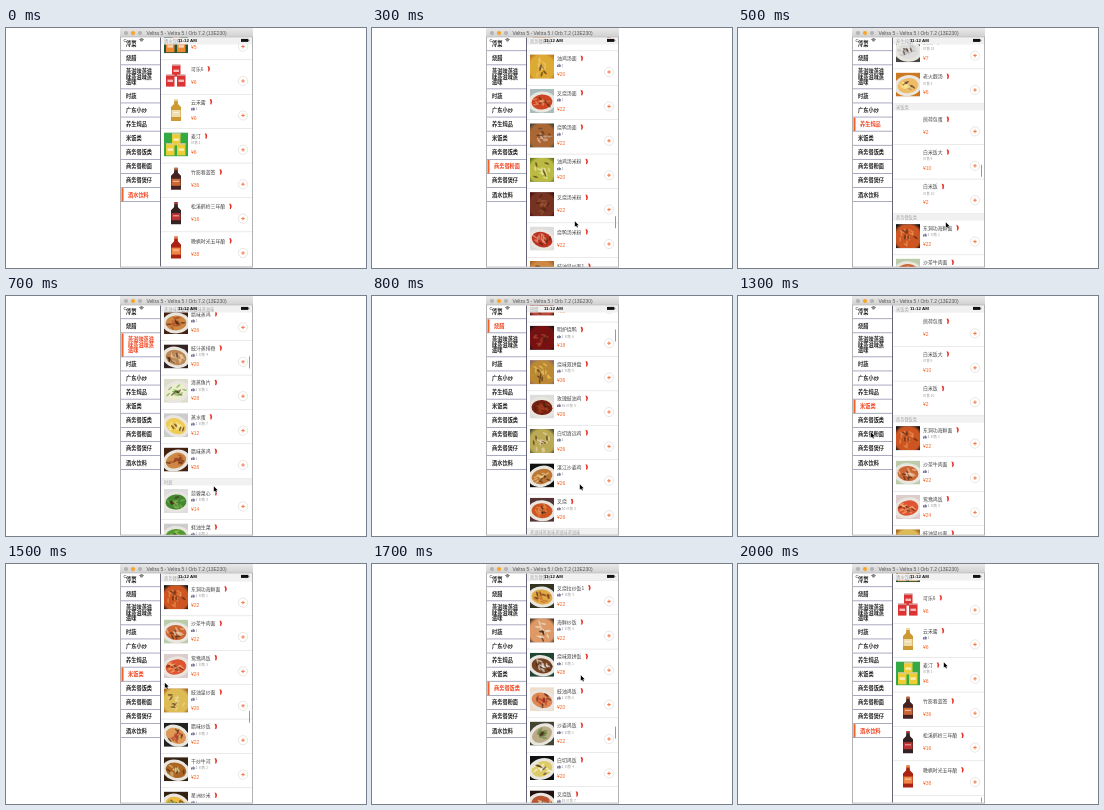
An HTML page with a canvas that plays this animation: 360 px wide and 240 px high, repeating every 2100 ms.

```html
<!DOCTYPE html>
<html lang="zh-CN">
<head>
<meta charset="utf-8">
<style>
html, body { margin: 0; width: 100%; height: 100%; overflow: hidden; background: #fff; }
canvas { display: block; width: 360px; height: 240px; }
</style>
</head>
<body>
<canvas id="stage"></canvas>
<script>
const LOOP = 2100, STEP = 100;
const ROW = 34.4, HEAD = 7, TOP = 9.5, VIEW = 229;
const CJK = '"Noto Sans CJK SC", "Noto Sans CJK", sans-serif';
const LATIN = '"Liberation Sans", Arial, sans-serif';

// Dish: name, price, likes/sold, picture kind (p plate, f full, b bottle, c cans, n none), backdrop, main tone, accent
const sections = [
  ['冷菜', 10, `凉拌青瓜 12 1/3 p #ddd #7a3 #cd8
    卤水拼盘 28 2/4 p #311 #a63 #d96
    皮蛋豆腐 15 1/2 p #ccc #eeb #543`],
  ['烧腊', 8, `脆皮乳鸽 22 3/2 p #321 #a52 #d84
    蜜汁排骨 32 1/5 f #411 #b43 #d75
    明炉烧鸭 18 2/6 f #211 #711 #a43
    烧味双拼盘 36 2/5 f #866 #b83 #ec6
    玫瑰豉油鸡 26 36/9 p #ddd #721 #a42
    白切清远鸡 26 2 f #553 #ba5 #edb
    湛江沙姜鸡 26 1 p #111 #b73 #ec8
    叉烧 26 30/3 p #533 #c52 #e95`],
  ['蒸滋味蒸滋味蒸滋味蒸滋味', 12, `豉汁蒸排骨 20 1/4 p #322 #b85 #eca
    清蒸鱼片 28 2/1 p #ddc #eec #6a4
    蒸水蛋 12 1/7 p #ccc #ec5 #fe9
    腊味蒸鸡 26 1 p #421 #c84 #a42`],
  ['时蔬', 10, `蒜蓉菜心 14 2/3 p #ddd #483 #8b5
    蚝油生菜 14 1/2 p #ccc #593 #ac6
    清炒芥兰 16 1 p #222 #373 #7a4`],
  ['广东小炒', 16, `干炒牛河 22 4/8 p #421 #a62 #dc8
    咕噜肉 26 2/4 p #ddd #d52 #fb5
    凉瓜炒蛋 20 1/3 p #332 #db4 #7a3
    椒盐排骨 28 3/2 p #211 #b73 #d95`],
  ['养生炖品', 9, `乌鸡炖汤 12 1/4 p #333 #864 #321
    花旗参汤 15 1 p #ddd #c95 #edb
    椰子炖鸡 16 2/3 p #432 #eda #fff
    淮山炖汤 12 1/2 p #433 #db8 #eee
    莲藕排骨汤 12 1/5 p #532 #b75 #dba
    雪梨炖盅 10 /6 p #ddd #ed9 #fff
    冬瓜炖汤 9 /8 p #344 #cc9 #eec
    例汤 7 /18 p #444 #ddd #bbb
    老火靓汤 6 /3 p #c72 #eb6 #fe9`],
  ['米饭类', 3, `煎荷包蛋 2 - n
    白米饭大 10 /9 n
    白米饭 2 /10 n`],
  ['商务餐饭类', 19, `东洞功海鲜面 22 1/1 f #111 #c52 #e95
    沙茶牛肉面 22 1 p #bca #c63 #eca
    鸳鸯鸡饭 24 1/3 p #dcc #d53 #fb7
    豉油皇炒面 20 1 f #a62 #db5 #ed9
    腊味炒饭 22 2/3 p #222 #d95 #b43
    干炒牛河 22 1/2 p #321 #a62 #dc8
    星洲炒米 22 1 p #321 #eb4 #7a3
    扬州炒饭 20 3/6 p #222 #eb6 #c53
    叉烧拉炒饭1 22 4/3 p #332 #da4 #c63
    海鲜炒饭 22 2/3 f #532 #d96 #eed
    烧味双拼饭 28 2/1 p #243 #742 #eee
    豉油鸡饭 20 1/6 p #edc #d85 #b32
    沙姜鸡饭 22 6/1 p #443 #ba8 #583
    白切鸡饭 20 2/4 p #111 #dc6 #fff
    叉烧饭 20 35/7 p #211 #b53 #eda`],
  ['商务餐粉面', 12, `牛腩汤面 24 1 p #322 #a63 #dc8
    鲜虾汤面 22 1 p #ddc #e94 #fd9
    油鸡汤面 20 1 f #b72 #da3 #ec7
    叉烧汤面 22 1 p #abb #c42 #e96
    烧鸭汤面 22 1 f #443 #a63 #dba
    油鸡汤米粉 20 1 f #672 #bb4 #eea
    叉烧汤米粉 22 - f #411 #732 #953
    烧鸭汤米粉 22 - p #ddd #b32 #ea8
    豉油皇炒面1 20 - f #a62 #c84 #db5`],
  ['商务餐煲仔', 7, `腊味煲仔饭 26 1/2 p #211 #b53 #eda
    排骨煲仔饭 26 2/3 p #222 #a74 #eda
    滑鸡煲仔饭 24 1 p #321 #da6 #fff`],
  ['酒水饮料', 8, `雪碧汽水 5 - c #fff #3a4
    橙汁 5 - c #253 #e83
    可乐6 6 - c #fff #d33
    云禾露 6 1 b #fff #c93 #eda
    麦汀 6 /1 c #3a4 #ec3
    竹影巷蓝签 36 - b #fff #422 #c63
    松溪鹤岭三年酿 16 - b #fff #322 #b33
    晚枫时光五年酿 38 - b #fff #a21 #e84`]
].map(([title, count, text]) => ({ title, count, dishes: text.split('\n').map(s => s.trim().split(' ')) }));

let total = 0;
for (const s of sections) {
  s.y = total;
  total += HEAD + s.count * ROW;
}
const END = total - VIEW;

// One value per step
const scrolls = [END, 3690, 3440, 3111, 2680, 2212, 1580, 880, 410, 260, 330, 1050, 1960, 2278, 2310, 2387, 2520, 2663.4, 3040, 3500, END + 7];
// time, x, y
const pointer = [[100, 206, 130], [300, 204, 196], [500, 209, 197], [800, 209, 191], [1100, 135, 111],
  [1300, 134, 139], [1400, 135, 125], [1700, 210, 114], [2000, 207, 101]];

const canvas = document.getElementById('stage');
const c = canvas.getContext('2d');
const dpr = window.devicePixelRatio || 1;
canvas.width = 360 * dpr;
canvas.height = 240 * dpr;

function rect(x, y, w, h, color) {
  c.fillStyle = color;
  c.fillRect(x, y, w, h);
}
function oval(x, y, rx, ry, color, turn = 0) {
  c.fillStyle = color;
  c.beginPath();
  c.ellipse(x, y, rx, ry, turn, 0, 7);
  c.fill();
}
function shape(points, color) {
  c.fillStyle = color;
  c.beginPath();
  points.forEach(([x, y]) => c.lineTo(x, y));
  c.fill();
}
function label(text, x, y, size, color, weight = 400, font = CJK, align = 'left') {
  c.font = `${weight} ${size}px ${font}`;
  c.textAlign = align;
  c.textBaseline = 'alphabetic';
  c.fillStyle = color;
  c.fillText(text, x, y + size * 0.37);
  return c.measureText(text).width;
}
function clipped(x, y, w, h, draw) {
  c.save();
  c.beginPath();
  c.rect(x, y, w, h);
  c.clip();
  draw();
  c.restore();
}
const noise = n => { const v = Math.sin(n * 127.1) * 43758.5; return v - Math.floor(v); };

function food(x, y, full, back, tone, accent, seed) {
  const cx = x + 12, cy = y + 13, turn = noise(seed) - 0.5;
  if (!full) oval(cx, cy, 14, 10.5, '#e9e5df', turn);
  const g = c.createRadialGradient(cx, cy, 4, cx, cy, full ? 16 : 12);
  g.addColorStop(0, tone);
  g.addColorStop(0.7, tone);
  g.addColorStop(1, full ? back : tone);
  if (full) rect(x, y, 24, 24, g);
  else oval(cx, cy, 10.5, 7.5, g, turn);
  c.globalAlpha = 0.6;
  for (let k = 1; k < 17; k++) {
    const a = noise(seed + k) * 6.28, r = noise(seed + k * 3.7);
    oval(cx + Math.cos(a) * r * 9, cy + Math.sin(a) * r * (full ? 9 : 6), 2.6, 0.9, k % 3 ? accent : '#421', turn * 2 + k % 2);
  }
  c.globalAlpha = 1;
}
function bottle(x, y, tone, tag) {
  shape([[10.5, 1], [13.5, 1], [14, 6], [17, 9], [17, 23], [7, 23], [7, 9], [10, 6]].map(p => [x + p[0], y + p[1]]), tone);
  rect(x + 7.5, y + 12, 9, 7, tag);
  rect(x + 9, y + 14, 6, 1.2, '#fff8');
  rect(x + 10.3, y + 1, 3.4, 2, tag);
}
function cans(x, y, tone) {
  for (const [dx, dy] of [[8, 1], [2, 11], [13, 11]]) {
    rect(x + dx, y + dy, 8.5, 12, tone);
    rect(x + dx, y + dy, 8.5, 1, '#ccc');
    rect(x + dx + 1.5, y + dy + 5, 5.5, 2.4, '#fffa');
  }
}
function picture(x, y, [kind, back, tone, accent], seed) {
  if (kind === 'n') return;
  clipped(x, y, 24, 24, () => {
    rect(x, y, 24, 24, back);
    if (kind === 'b') bottle(x, y, tone, accent);
    else if (kind === 'c') cans(x, y, tone);
    else food(x, y, kind === 'f', back, tone, accent, seed);
  });
}

function likes(text, y) {
  const [up, sold] = text.split('/');
  let x = 185;
  if (up) {
    rect(x, y - 0.5, 1, 2.2, '#779');
    shape([[x + 1.3, y - 0.4], [x + 2.2, y - 1.8], [x + 2.8, y - 0.6], [x + 4, y - 0.5], [x + 3.5, y + 1.7], [x + 1.3, y + 1.7]], '#779');
    x += 4.6 + label(up, x + 4.6, y, 3.4, '#888') + 1;
  }
  if (sold) label('已售 ' + sold, x, y, 3.4, '#999');
}

function dishRow([name, price, liked, ...pic], y, seed) {
  const rated = liked !== '-';
  picture(158, y + 3.5, pic, seed);
  const ny = y + (rated ? 7.2 : 8.7);
  const fx = 185 + label(name, 185, ny, 4.9, '#444') + 4;
  shape([[fx, ny - 2.8], [fx + 1.8, ny - 2.4], [fx + 2.5, ny], [fx + 1.7, ny + 2.7], [fx + 0.5, ny + 2.5], [fx + 0.8, ny]], '#e5352b');
  if (rated) likes(liked, y + 14.2);
  label('¥' + price, 185, y + (rated ? 23.2 : 21.7), 5, '#f4692b', 400, LATIN);
  c.strokeStyle = '#ddd6d2';
  c.lineWidth = 0.6;
  c.beginPath();
  c.arc(237, y + 20.9, 4.6, 0, 7);
  c.stroke();
  rect(235.2, y + 20.45, 3.6, 0.9, '#f4703a');
  rect(236.55, y + 19.1, 0.9, 3.6, '#f4703a');
  rect(155, y + ROW - 0.5, 91, 0.5, '#d4d4d4');
}

function header(title, y) {
  rect(155, y, 91, HEAD, '#f1f1f1');
  label(title, 158, y + 3.5, 4.2, '#a4a4a4');
}

function list(scroll, active) {
  const at = y => y - scroll + TOP;
  sections.forEach((s, n) => {
    for (let i = 0; i < s.count; i++) {
      const y = at(s.y + HEAD + i * ROW);
      if (y > -ROW && y < 240) dishRow(s.dishes[i % s.dishes.length], y, n * 40 + i * 7);
    }
    header(s.title, at(s.y));
  });
  const next = sections[active + 1];
  header(sections[active].title, next ? Math.min(TOP, at(next.y) - HEAD) : TOP);
}

function menu(active) {
  let y = 8.7;
  sections.forEach((s, i) => {
    const lines = s.title.match(/.{1,5}/gu);
    const h = lines.length > 1 ? 24 : 14.1;
    const on = i === active;
    if (on) rect(115.5, y + 0.5, 2, h - 0.7, '#f4602a');
    lines.forEach((t, k) => label(t, on ? 122 : 120.1, y + h / 2 + (k - (lines.length - 1) / 2) * 5.4, 5.2, on ? '#f0441f' : '#222', 700));
    y += h;
    rect(115, y - 0.4, 39, 0.7, '#8587a5');
  });
  rect(154, TOP, 0.9, VIEW, '#555568');
}

function chrome() {
  const g = c.createLinearGradient(0, 0, 0, 9);
  g.addColorStop(0, '#e9e9e9');
  g.addColorStop(1, '#d0d0d0');
  rect(114, 0, 133, 9, g);
  rect(114, 8.8, 133, 0.5, '#aaa');
  ['#b4b4b4', '#f6a62c', '#b4b4b4'].forEach((color, i) => oval(120 + i * 7, 5.1, 2.1, 2.1, color));
  label('Veltra 5 - Veltra 5 / Orb 7.2 (13E230)', 180.5, 5, 4.95, '#555', 400, LATIN, 'center');
  rect(114, 9, 0.9, 230, '#aaa');
  rect(246, 9, 0.9, 230, '#aaa');
  rect(114, 238.7, 133, 0.8, '#aaa');
}

function statusBar() {
  label('Carrier', 117.5, 12.4, 4.2, '#111', 400, LATIN);
  c.strokeStyle = '#111';
  c.lineWidth = 0.7;
  for (const r of [1, 2.1, 3.2]) {
    c.beginPath();
    c.arc(135.5, 14, r, -2.3, -0.84);
    c.stroke();
  }
  label('11:12 AM', 181.4, 12.4, 4.4, '#111', 700, LATIN, 'center');
  rect(235, 10.9, 7.3, 3, '#111');
  rect(242.6, 11.8, 0.6, 1.3, '#111');
}

function scrollBar(scroll) {
  const over = Math.max(0, scroll - END), h = 12 - over;
  const y = over ? TOP + VIEW - h : TOP + 0.5 + scroll / END * 216;
  rect(243, y, 1, h, '#999');
}

function arrow(t) {
  const k = pointer.findIndex(p => p[0] >= t);
  if (t < pointer[0][0] || k < 0) return;
  const b = pointer[k], a = pointer[Math.max(0, k - 1)];
  const f = b === a ? 1 : (t - a[0]) / (b[0] - a[0]);
  const x = a[1] + (b[1] - a[1]) * f - 1.2, y = a[2] + (b[2] - a[2]) * f - 2.7;
  c.beginPath();
  [[0, 0], [0, 5.4], [1.3, 4.3], [2.2, 6.3], [3.1, 5.9], [2.3, 4], [3.9, 3.9]].forEach(p => c.lineTo(x + p[0], y + p[1]));
  c.closePath();
  c.strokeStyle = '#fff';
  c.lineWidth = 1;
  c.stroke();
  c.fillStyle = '#000';
  c.fill();
}

function draw(now) {
  const step = Math.floor(now % LOOP / STEP), t = step * STEP;
  const scroll = scrolls[step];
  const active = sections.filter(s => s.y <= scroll + 0.5).length - 1;
  c.setTransform(dpr, 0, 0, dpr, 0, 0);
  rect(0, 0, 360, 240, '#fff');
  clipped(114, TOP - 0.5, 133, VIEW + 1, () => {
    list(scroll, active);
    menu(active);
    if (t !== 0 && t !== 1300) scrollBar(scroll);
    statusBar();
  });
  chrome();
  arrow(t);
}

const start = performance.now();
(function tick() {
  draw(Math.max(0, performance.now() - start));
  requestAnimationFrame(tick);
})();
</script>
</body>
</html>
```
